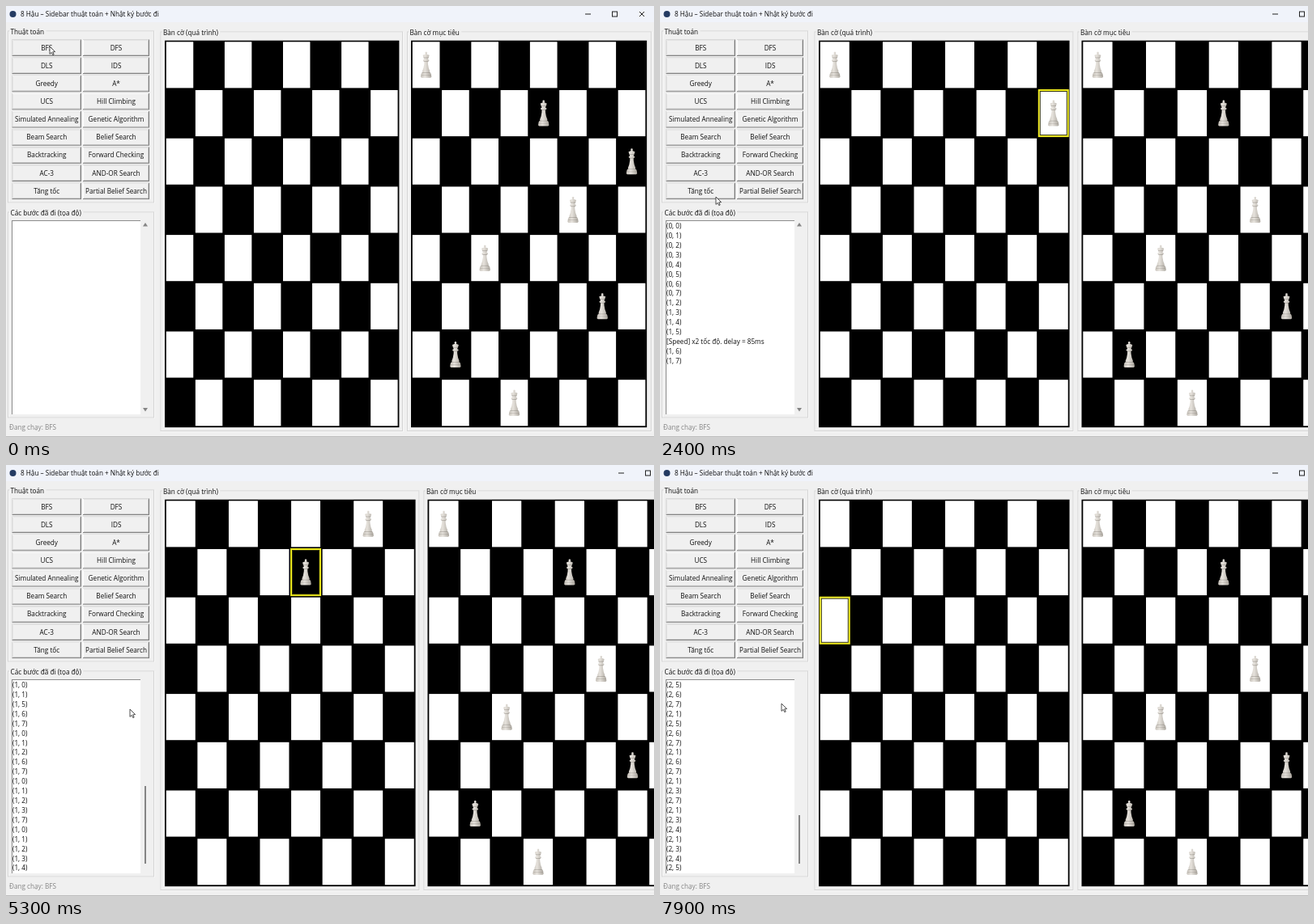
These frames come from a looping animation (800 by 533 pixels, 8 s). An HTML page with a canvas:

```html
<!DOCTYPE html>
<html lang="vi">
<head>
<meta charset="utf-8">
<title>8 Hậu</title>
<style>
html, body { margin: 0; width: 100%; height: 100%; overflow: hidden; background: #f0f0f0; }
canvas { display: block; width: 800px; height: 533px; }
</style>
</head>
<body>
<canvas id="stage"></canvas>
<script>
const W = 800, H = 533, LOOP = 8000, N = 8;
const canvas = document.getElementById('stage');
const ctx = canvas.getContext('2d');
const dpr = window.devicePixelRatio || 1;
canvas.width = W * dpr;
canvas.height = H * dpr;
ctx.scale(dpr, dpr);

const FONT = '8.2px "Open Sans", "Noto Sans", sans-serif';
const GOAL = [0, 4, 7, 5, 2, 6, 1, 3];
const BUTTONS = ['BFS', 'DFS', 'DLS', 'IDS', 'Greedy', 'A*', 'UCS', 'Hill Climbing',
  'Simulated Annealing', 'Genetic Algorithm', 'Beam Search', 'Belief Search',
  'Backtracking', 'Forward Checking', 'AC-3', 'AND-OR Search', 'Tăng tốc', 'Partial Belief Search'];

// Search timing: slow steps first, then the doubled speed.
const SLOW = 12, FAST_START = 2291, LAST = 72, SPEED_TIME = 2180;
const stepTime = n => n <= SLOW ? 100 + (n - 1) * 182 : FAST_START + (n - SLOW - 1) * 95;
const steps = breadthFirst(LAST);

function breadthFirst(limit) {
  const found = [], queue = [[]];
  while (found.length < limit) {
    const state = queue.shift();
    for (let c = 0; c < N; c++) {
      const safe = state.every((q, r) => q !== c && Math.abs(q - c) !== state.length - r);
      if (!safe) continue;
      const next = [...state, c];
      queue.push(next);
      found.push(next);
    }
  }
  return found.slice(0, limit);
}

// time, x, y of the pointer tip
const PATH = [[0, 54, 50], [300, 56, 54], [1300, 72, 116], [2000, 69, 234], [2400, 69, 236],
  [3300, 150, 314], [3600, 151, 315], [4600, 153, 302], [5300, 153, 302], [6200, 150, 295], [LOOP, 150, 295]];

function pointerAt(t) {
  let i = 0;
  while (i < PATH.length - 2 && t >= PATH[i + 1][0]) i++;
  const [t0, x0, y0] = PATH[i], [t1, x1, y1] = PATH[i + 1];
  const u = (t - t0) / (t1 - t0), k = u * u * (3 - 2 * u);
  return [x0 + (x1 - x0) * k, y0 + (y1 - y0) * k];
}

function box(x, y, w, h, color) {
  ctx.fillStyle = color;
  ctx.fillRect(x, y, w, h);
}

function outline(x, y, w, h, color, width = 1) {
  ctx.strokeStyle = color;
  ctx.lineWidth = width;
  ctx.strokeRect(x, y, w, h);
}

function text(str, x, y, color = '#111', align = 'left') {
  ctx.font = FONT;
  ctx.textAlign = align;
  ctx.fillStyle = color;
  ctx.fillText(str, x, y);
}

function polygon(points, color) {
  ctx.beginPath();
  points.forEach(([x, y]) => ctx.lineTo(x, y));
  ctx.closePath();
  ctx.fillStyle = color;
  ctx.fill();
}

function group(title, x, y, w, h) {
  outline(x + 1, y + 1, w, h, '#fff');
  outline(x + .5, y + .5, w, h, '#d4d4d4');
  ctx.font = FONT;
  box(x + 2, y - 2, ctx.measureText(title).width + 4, 5, '#f0f0f0');
  text(title, x + 3.5, y + 4);
}

function titleBar(wide) {
  box(0, 0, W, 20, '#f0f3fa');
  ctx.fillStyle = '#243b63';
  ctx.beginPath();
  ctx.arc(8.5, 10, 4, 0, Math.PI * 2);
  ctx.fill();
  text('8 Hậu – Sidebar thuật toán + Nhật ký bước đi', 18, 13);
  const dx = wide ? 41 : 0;
  box(715 + dx, 9.5, 7, 1, '#222');
  outline(748.5 + dx, 7, 6, 6, '#222');
  ctx.beginPath();
  ctx.moveTo(782 + dx, 7);
  ctx.lineTo(788 + dx, 13);
  ctx.moveTo(788 + dx, 7);
  ctx.lineTo(782 + dx, 13);
  ctx.stroke();
}

function button(label, x, y, w) {
  const h = 20.4;
  box(x, y, w, h, '#7a7a7a');
  box(x, y, w - 1, h - 1, '#fff');
  box(x + 1, y + 1, w - 2, h - 2, '#b4b4b4');
  box(x + 1, y + 1, w - 2.6, h - 2.6, '#f0f0f0');
  text(label, x + w / 2, y + 13, '#111', 'center');
}

function sidebar() {
  group('Thuật toán', 2, 30.5, 180, 212);
  BUTTONS.forEach((label, i) => {
    const right = i % 2;
    button(label, right ? 95 : 7.5, 41.5 + (i >> 1) * 22.15, right ? 82 : 85.5);
  });
  group('Các bước đã đi (tọa độ)', 2, 254.5, 180, 254);
  text('Đang chạy: BFS', 4, 524, '#858585');
}

function logBox(lines) {
  const rows = 20;
  box(7, 265, 159, 240, '#fff');
  box(7, 265, 159, 1, '#8c8c8c');
  box(7, 265, 1, 240, '#8c8c8c');
  lines.slice(-rows).forEach((line, i) => text(line, 8, 275 + i * 11.92));
  if (lines.length > rows) {
    const size = 216 * rows / lines.length;
    box(171, 493 - size, 2, size, '#858585');
  } else {
    polygon([[169, 272.5], [175, 272.5], [172, 268]], '#858585');
    polygon([[169, 497], [175, 497], [172, 501.5]], '#858585');
  }
}

// Half-widths of the piece from top to bottom
const PROFILE = [[.8, -16], [1.4, -14.6], [.9, -13.2], [4, -12], [3.3, -9.5], [2.2, -7], [3.7, -6],
  [3.7, -5], [2.2, -4], [2.3, -1], [3.2, 4], [4.7, 8], [4.3, 9], [5.8, 10.3], [6.3, 12], [6.7, 15], [5.5, 16]];

function queen(cx, cy) {
  const shade = ctx.createLinearGradient(cx - 7, 0, cx + 7, 0);
  shade.addColorStop(0, '#c5c0b8');
  shade.addColorStop(.4, '#e6e2dc');
  shade.addColorStop(1, '#aaa59d');
  const right = PROFILE.map(([w, y]) => [cx + w, cy + y]);
  const left = PROFILE.map(([w, y]) => [cx - w, cy + y]).reverse();
  polygon([...right, ...left], shade);
  box(cx - 3.2, cy - 9.2, 6.4, .7, 'rgba(90,85,78,.45)');
  box(cx - 3, cy - 4.5, 6, .7, 'rgba(90,85,78,.45)');
  box(cx - 5.2, cy + 9.2, 10.4, .7, 'rgba(90,85,78,.4)');
  box(cx - 6, cy + 12.3, 12, .6, 'rgba(90,85,78,.3)');
}

function board(x, pitch, queens, active) {
  const y = 43, ph = 59.7, gap = 1.3;
  box(x - .5, y - .3, pitch * N + 1, ph * N + .8, '#000');
  for (let r = 0; r < N; r++) {
    for (let c = r % 2; c < N; c += 2) {
      box(x + c * pitch + gap, y + r * ph + gap, pitch - 2 * gap, ph - 2 * gap, '#fff');
    }
  }
  if (active) {
    const [r, c] = active, left = x + c * pitch, top = y + r * ph;
    outline(left + 1.3, top + 1.3, pitch - 2.6, ph - 2.6, '#eeea1c', 2);
    outline(left + 2.8, top + 2.8, pitch - 5.6, ph - 5.6, '#35350c', 1);
  }
  queens.forEach((c, r) => queen(x + (c + .5) * pitch, y + (r + .5) * ph));
}

function pointer(x, y) {
  const shape = [[0, 0], [0, 9.4], [2.2, 7.4], [3.8, 10.6], [5.2, 10], [3.7, 6.8], [6.6, 6.6]];
  polygon(shape.map(([a, b]) => [x + a, y + b]), '#fff');
  ctx.strokeStyle = '#222';
  ctx.lineWidth = .8;
  ctx.stroke();
}

function draw(t) {
  let n = 0;
  while (n < LAST && stepTime(n + 1) <= t) n++;
  const wide = n > 0;
  const state = n ? steps[n - 1] : [];
  const active = wide && [state.length - 1, state[state.length - 1]];
  const pending = n === LAST; // marked, but not yet placed or logged

  const lines = steps.slice(0, pending ? n - 1 : n).map(s => `(${s.length - 1}, ${s[s.length - 1]})`);
  if (t >= SPEED_TIME) lines.splice(SLOW, 0, '[Speed] x2 tốc độ. delay = 85ms');

  box(0, 0, W, H, '#f0f0f0');
  titleBar(wide);
  sidebar();
  logBox(lines);
  group('Bàn cờ (quá trình)', 190.5, 31.5, wide ? 319 : 298.5, 493.5);
  group('Bàn cờ mục tiêu', wide ? 515.5 : 495, 31.5, wide ? 322 : 301, 493.5);
  board(196.5, wide ? 38.57 : 36.05, pending ? [] : state, active);
  board(wide ? 521 : 500.5, wide ? 38.85 : 36.27, GOAL);
  box(0, 532, W, 1, '#bdbdbd');
  pointer(...pointerAt(t));
}

const start = performance.now();
function tick() {
  const t = (performance.now() - start) % LOOP;
  draw(Math.floor(t / 100) * 100);
  requestAnimationFrame(tick);
}
tick();
</script>
</body>
</html>
```
